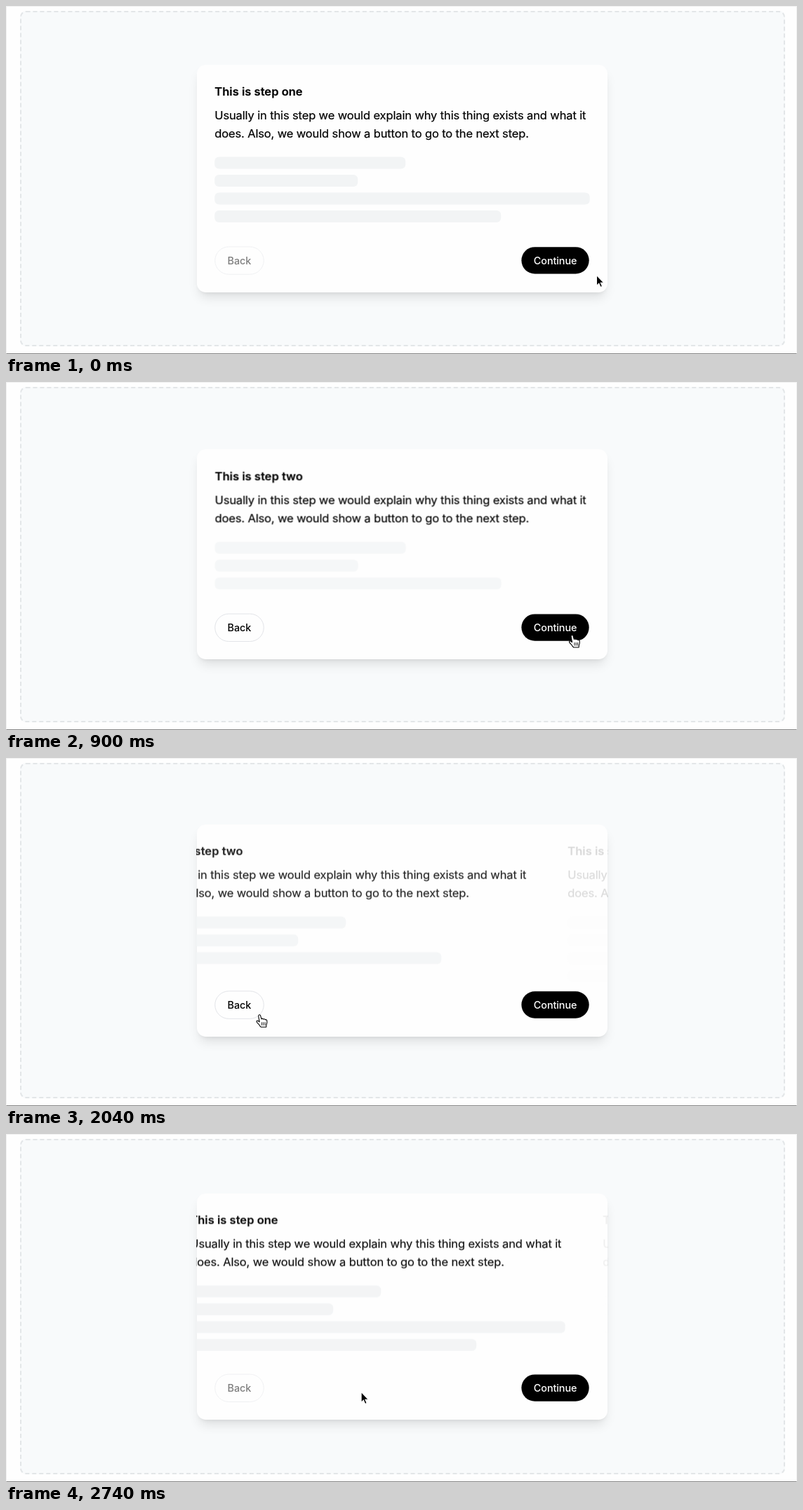
Write an HTML page that moves like this. It is 1127 px wide and 497 px high and loops after 2.76 s.

```html
<!DOCTYPE html>
<html lang="en">
<head>
<meta charset="utf-8">
<title>Multi-step card</title>
<style>
  html, body { margin: 0; width: 100%; height: 100%; overflow: hidden; background: #fff; }
  #stage { position: relative; width: 1127px; height: 497px; overflow: hidden; background: #fefefe; }
  #stage > * { position: absolute; box-sizing: border-box; }
  #edge { inset: 0; border: 1px solid #f0f0f0; border-bottom-color: #858585; }
  #area { left: 20px; top: 7px; width: 1090px; height: 479px; border: 2px dashed #e3e6e8; border-radius: 8.5px; background: #f8fafb; }
  #card { left: 271.75px; width: 585.5px; border-radius: 12.75px; background: #fefefe;
    box-shadow: 0 10.6px 16px -3.2px rgba(0,0,0,.1), 0 4.25px 6.4px -4.25px rgba(0,0,0,.1); }
  svg { left: 0; top: 0; font-family: Inter, "Open Sans", sans-serif; font-optical-sizing: none; }
  .title, .body { font-size: 16.5px; stroke: #000; stroke-width: .2px; }
  .title { font-weight: 600; letter-spacing: .03px; }
  .body { letter-spacing: -.135px; }
  .label { font-size: 14.4px; font-weight: 500; letter-spacing: -.08px; text-anchor: middle; }
</style>
</head>
<body>
<div id="stage">
  <div id="edge"></div>
  <div id="area"></div>
  <div id="card"></div>
  <svg width="1127" height="497" viewBox="0 0 1127 497">
    <clipPath id="clip"><rect id="clipRect" x="271.75" y="0" width="585.5" rx="12.75"/></clipPath>
    <g id="content" clip-path="url(#clip)"></g>
    <g id="buttons">
      <g id="back">
        <rect x="297.75" y="-65.4" width="69.5" height="39.4" rx="19.7" fill="#fefefe" stroke="#e2e4e8"/>
        <text class="label" x="332.4" y="-40.5">Back</text>
      </g>
      <g id="next">
        <rect x="734.4" y="-65.1" width="96.3" height="38.4" rx="19.2"/>
        <text class="label" x="782.6" y="-40.5" fill="#fff">Continue</text>
      </g>
    </g>
    <g id="pointer">
      <g id="arrow">
        <path d="M0 0V14.8L3.3 11.7L5.5 17L8 15.9L5.8 10.8H10.4Z" stroke="#fff" stroke-width="1.1"/>
        <g id="denied" transform="translate(9.7 24.5)">
          <circle r="9.6" fill="#fff"/>
          <circle r="7.2" fill="#f4f4f4" stroke="#858585" stroke-width="2.6"/>
          <path d="M-5 -5L5 5" stroke="#858585" stroke-width="2.6"/>
        </g>
      </g>
      <g id="hand" transform="translate(-5 -1.4) scale(1.1)" stroke="#000" stroke-linejoin="round" stroke-linecap="round">
        <path fill="#fff" d="M5 15.5C4.5 14 2.5 12.5 1.2 10.8C.3 9.6 1 8.4 2.2 8.8C3 9 3.8 9.7 4.5 10.3L3.2 3C3 1 5.2 .3 5.8 2L7.1 6.6C7.6 5.6 9.2 5.8 9.5 6.9C10.2 6.1 11.6 6.5 11.9 7.5C12.8 7 14 7.6 14.2 8.7C14.6 11 14.4 12.5 13.4 14.5L13.2 17H6.5Z"/>
        <path d="M7.6 11V14.4M9.7 11V14.4M11.8 11V14.4" stroke-width=".8"/>
      </g>
    </g>
  </svg>
</div>
<script>
const LOOP = 2760;
const LEFT = 297.25;
const FULL = 534.5;
const TRAVEL = FULL * 1.1;
const CENTER = 246.5;
const SPRING = 0.03;   // critically damped, per ms
const PULSE = 1230;

const steps = [
  { name: 'one', bars: [272, 204, FULL, 408] },
  { name: 'two', bars: [272, 204, 408] },
  { name: 'three', bars: [272, 204, 136, 408] },
];
const changes = [
  { at: 572, from: 0, to: 1, dir: 1 },
  { at: 1115, from: 1, to: 2, dir: 1 },
  { at: 1927, from: 2, to: 1, dir: -1 },
  { at: 2590, from: 1, to: 0, dir: -1 },
];
// The skeleton pulse rests during these spans.
const quiet = [[900, 1100], [1620, 1940], [2420, 2540]];
// time, x, y of the pointer tip
const track = [
  [0, 841.5, 384.5], [20, 841.5, 384.5], [120, 811, 358.5], [320, 811, 358.5],
  [420, 806.6, 361.3], [1114, 806.6, 361.8], [1115, 807.3, 355.5], [1300, 807.3, 355.5],
  [1620, 357, 367.2], [1700, 336.3, 366.5], [1930, 336.3, 366.5], [2040, 361.2, 367],
  [2160, 361.2, 367], [2400, 353, 356.5], [2590, 353, 356.5], [2750, 507.5, 368.6],
];

const $ = id => document.getElementById(id);
const show = (el, on) => el.setAttribute('display', on ? 'inline' : 'none');
const place = (el, x, y) => el.setAttribute('transform', `translate(${x} ${y})`);
const mix = (a, b, p) => a + (b - a) * p;
const smooth = p => p * p * (3 - 2 * p);
const spring = ms => 1 - (1 + SPRING * ms) * Math.exp(-SPRING * ms);
const pulse = age => 0.75 + 0.25 * Math.cos(2 * Math.PI * age / PULSE);
const cardHeight = step => 223.5 + 25.5 * steps[step].bars.length;

$('content').innerHTML = steps.map(({ name, bars }) => `<g>
  <text class="title" x="${LEFT}" y="44.25">This is step ${name}</text>
  <text class="body" x="${LEFT}" y="78.25">Usually in this step we would explain why this thing exists and what it</text>
  <text class="body" x="${LEFT}" y="103.75">does. Also, we would show a button to go to the next step.</text>
  <g class="bars" fill="#f2f4f5">${bars.map((w, i) =>
    `<rect x="${LEFT}" y="${131.7 + 25.5 * i}" width="${w}" height="17" rx="6.2"/>`).join('')}</g>
</g>`).join('');
const panels = [...$('content').children];
const barGroups = panels.map(panel => panel.querySelector('.bars'));

function drawPanel(step, x, opacity, age) {
  show(panels[step], opacity > 0.003);
  place(panels[step], x, 0);
  panels[step].setAttribute('opacity', opacity);
  barGroups[step].setAttribute('opacity', pulse(age));
}

function pointerAt(t) {
  const i = Math.max(1, track.findIndex(key => key[0] > t));
  const [a, b] = [track[i - 1], track[i]];
  const p = smooth(Math.min(1, (t - a[0]) / (b[0] - a[0])));
  return [mix(a[1], b[1], p), mix(a[2], b[2], p)];
}

function drawPointer(t, current) {
  const [x, y] = t < track.at(-1)[0] ? pointerAt(t) : track.at(-1).slice(1);
  const overNext = x > 734 && x < 831;
  const overBack = x > 298 && x < 368;
  const denied = overNext && current === 2;
  const hand = (overNext && !denied) || (overBack && current > 0);
  place($('pointer'), x, y);
  show($('hand'), hand);
  show($('arrow'), !hand);
  show($('denied'), denied);
}

function draw(t) {
  const index = changes.findLastIndex(change => change.at <= t);
  const rest = quiet.find(([a, b]) => t >= a && t < b);
  const pulseTime = rest ? rest[0] : t;
  const { at, from, to, dir } = changes[index] || { at: t, from: 1, to: 0, dir: 1 };
  const p = index < 0 ? 1 : spring(t - at);

  panels.forEach(panel => show(panel, false));
  const fromAge = index > 0 ? pulseTime - changes[index - 1].at : 0;
  drawPanel(from, -dir * TRAVEL * p, 1 - p, fromAge);
  drawPanel(to, dir * TRAVEL * (1 - p), p, Math.max(0, pulseTime - at));

  const height = mix(cardHeight(from), cardHeight(to), p);
  const top = CENTER - height / 2;
  $('card').style.top = top + 'px';
  $('card').style.height = height + 'px';
  $('clipRect').setAttribute('height', height);
  place($('content'), 0, top);
  place($('buttons'), 0, top + height);
  $('back').setAttribute('opacity', to === 0 ? 0.5 : 1);
  $('next').setAttribute('opacity', to === 2 ? 0.5 : 1);
  drawPointer(t, to);
}

const start = performance.now();
function tick() {
  draw((performance.now() - start) % LOOP);
  requestAnimationFrame(tick);
}
tick();
</script>
</body>
</html>
```
